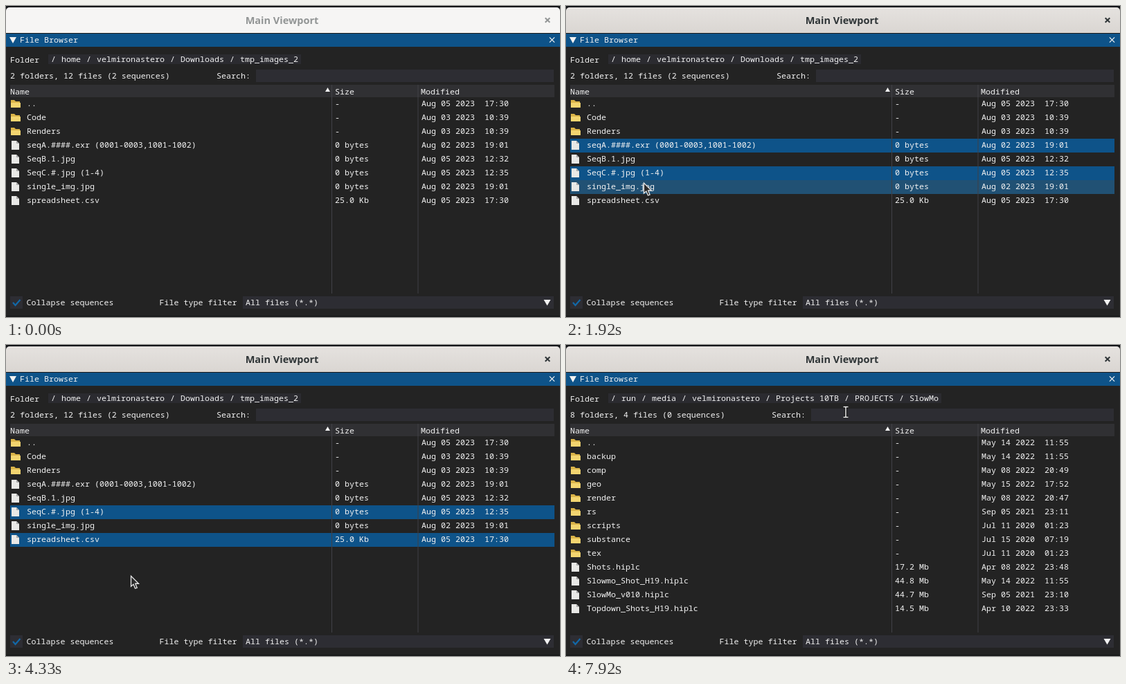
These frames come from a looping animation (800x450 px, 8000 ms). An HTML page with a canvas:

```html
<!DOCTYPE html>
<html>
<head>
<meta charset="utf-8">
<style>
html, body { margin: 0; width: 100%; height: 100%; overflow: hidden; background: #232323; }
canvas { display: block; width: 800px; height: 450px; }
</style>
</head>
<body>
<canvas id="stage" width="800" height="450"></canvas>
<script>
const g = document.getElementById('stage').getContext('2d');
const LOOP = 8000, STEP = 1000 / 12;
const BLUE = '#0e5389', HOVER = '#215174', FIELD = '#2d2d33', WHITE = '#f2f2f2';
const FOCUS_AT = 830, CLEAR_AT = 4400, OPEN_AT = 6550;

// name | size | date; an empty size marks a folder
const parse = text => text.trim().split('\n').map(line => line.split('|'));
const folders = [
  {
    path: ['/', 'home', '/', 'velmironastero', '/', 'Downloads', '/', 'tmp_images_2'],
    info: '2 folders, 12 files (2 sequences)',
    rows: parse(`
..||Aug 05 2023  17:30
Code||Aug 03 2023  10:39
Renders||Aug 03 2023  10:39
seqA.####.exr (0001-0003,1001-1002)|0 bytes|Aug 02 2023  19:01
SeqB.1.jpg|0 bytes|Aug 05 2023  12:32
SeqC.#.jpg (1-4)|0 bytes|Aug 05 2023  12:35
single_img.jpg|0 bytes|Aug 02 2023  19:01
spreadsheet.csv|25.0 Kb|Aug 05 2023  17:30`)
  },
  {
    path: ['/', 'run', '/', 'media', '/', 'velmironastero', '/', 'Projects 10TB', '/', 'PROJECTS', '/', 'SlowMo'],
    info: '8 folders, 4 files (0 sequences)',
    rows: parse(`
..||May 14 2022  11:55
backup||May 14 2022  11:55
comp||May 08 2022  20:49
geo||May 15 2022  17:52
render||May 08 2022  20:47
rs||Sep 05 2021  23:11
scripts||Jul 11 2020  01:23
substance||Jul 15 2020  07:19
tex||Jul 11 2020  01:23
Shots.hiplc|17.2 Mb|Apr 08 2022  23:48
Slowmo_Shot_H19.hiplc|44.8 Mb|May 14 2022  11:55
SlowMo_v010.hiplc|44.7 Mb|Sep 05 2021  23:10
Topdown_Shots_H19.hiplc|14.5 Mb|Apr 10 2022  23:33`)
  }
];

// pointer stops: time, x, y
const stops = [
  [450, -15, 297], [800, 90, 203], [1000, 100, 205], [1250, 138, 237], [1420, 138, 238],
  [1750, 120, 289], [2080, 105, 224], [2200, 105, 224], [2550, 60, 426], [2900, 93, 287],
  [3000, 93, 287], [3280, 118, 222], [3380, 118, 221], [3570, 128, 195], [3750, 128, 196],
  [4250, 180, 334], [4500, 182, 335], [5000, 408, 79], [5420, 402, 79], [5900, 85, 79],
  [6120, 61, 79], [6330, 100, 79], [6417, 232, 79], [6500, 250, 79], [6660, 408, 79],
  [7000, 515, 79], [7400, 440, 80], [7850, 404, 97], [8000, 404, 97]
];
// clicks that toggle a row: time, row
const clicks = [[FOCUS_AT, 3], [1420, 5], [2080, 4], [2960, 7], [3300, 4], [3700, 3]];

function pointerAt(t) {
  if (t < 490) return [-99, -99];
  const i = stops.findIndex(s => s[0] > t);
  const [t0, x0, y0] = stops[i - 1], [t1, x1, y1] = stops[i];
  let k = (t - t0) / (t1 - t0);
  k = k * k * (3 - 2 * k);
  return [x0 + (x1 - x0) * k, y0 + (y1 - y0) * k];
}

function box(x, y, w, h, color) {
  g.fillStyle = color;
  g.fillRect(x, y, w, h);
}

function poly(points, color) {
  g.beginPath();
  for (let i = 0; i < points.length; i += 2) g.lineTo(points[i], points[i + 1]);
  g.closePath();
  g.fillStyle = color;
  g.fill();
}

function lines(points, color, width) {
  g.beginPath();
  for (let i = 0; i < points.length; i += 4) {
    g.moveTo(points[i], points[i + 1]);
    g.lineTo(points[i + 2], points[i + 3]);
  }
  g.strokeStyle = color;
  g.lineWidth = width;
  g.stroke();
}

const cross = (x, y, r, color, w) =>
  lines([x - r, y - r, x + r, y + r, x - r, y + r, x + r, y - r], color, w);

// monospaced label, seven pixels per character, centred on y
function label(text, x, y) {
  g.font = '11.667px "Noto Sans Mono", "DejaVu Sans Mono", monospace';
  g.textAlign = 'left';
  g.fillStyle = WHITE;
  g.fillText(text, x, y + 4);
}

function folderIcon(y) {
  poly([7, y - 5, 12, y - 5, 14, y - 3, 20, y - 3, 20, y + 6, 7, y + 6], '#d9b348');
  poly([7, y - 1, 21, y - 1, 21, y + 6, 7, y + 6], '#f3d570');
}

function fileIcon(y) {
  poly([8, y - 6, 15, y - 6, 19, y - 2, 19, y + 7, 8, y + 7], '#e8e8e6');
  poly([15, y - 6, 19, y - 2, 15, y - 2], '#a9a9a9');
}

function windowFrame(focused) {
  box(0, 0, 800, 450, '#232323');
  box(0, 0, 800, 4, '#141619');
  const fill = g.createLinearGradient(0, 2, 0, 39);
  fill.addColorStop(0, focused ? '#e5e2df' : '#f6f5f4');
  fill.addColorStop(1, focused ? '#dad6d2' : '#f6f5f4');
  g.fillStyle = fill;
  g.beginPath();
  g.roundRect(0, 2, 800, 37, [5, 5, 0, 0]);
  g.fill();
  const ink = focused ? '#2f3537' : '#929595';
  g.font = '600 14.5px "Noto Sans", "Open Sans", sans-serif';
  g.textAlign = 'center';
  g.fillStyle = ink;
  g.fillText('Main Viewport', 398.5, 26);
  cross(782, 20.5, 3.3, ink, 2);

  box(0, 39, 800, 1, '#1b1b1b');
  box(0, 40, 800, 19, BLUE);
  poly([5, 45, 15, 45, 10, 54], WHITE);
  label('File Browser', 20, 49);
  cross(788.5, 49, 3.6, WHITE, 1.2);
}

function footer() {
  box(6, 420, 18, 18, FIELD);
  g.beginPath();
  g.moveTo(10, 429);
  g.lineTo(13.5, 433);
  g.lineTo(20.5, 425);
  g.strokeStyle = '#1268a8';
  g.lineWidth = 2.2;
  g.stroke();
  label('Collapse sequences', 29.5, 429);
  label('File type filter', 221.5, 429);
  box(342, 420, 449, 18, FIELD);
  label('All files (*.*)', 346, 429);
  poly([776.5, 425, 786.5, 425, 781.5, 433.5], WHITE);
  box(0, 448, 800, 2, '#191a1b');
}

function pathBar(path, px, py) {
  label('Folder', 6, 78);
  let x = 65;
  for (const part of path) {
    const w = part.length * 7 + 8;
    const over = px >= x - 4 && px < x - 4 + w && py >= 70 && py < 85;
    box(x - 4, 70, w, 14, over ? HOVER : '#2b2b30');
    label(part, x, 77);
    x += w;
  }
}

function table(rows, selected, px, py) {
  box(6, 114, 786, 18, '#303033');
  label('Name', 6, 124);
  label('Size', 475, 124);
  label('Modified', 599, 124);
  poly([461, 124, 468, 124, 464.5, 118], WHITE);
  rows.forEach(([name, size, date], i) => {
    const y = 141 + 20 * i;
    const over = px >= 6 && px < 792 && py >= y - 9 && py < y + 11;
    if (over || selected.has(i)) box(6, y - 9, 786, 20, over ? HOVER : BLUE);
    (size ? fileIcon : folderIcon)(y);
    label(name, 30, y);
    label(size || '-', 475, y);
    label(date, 600, y);
  });
  box(470, 114, 1, 302, '#414147');
  box(594.5, 114, 1, 302, '#414147');
}

function arrow(x, y) {
  g.save();
  g.translate(x, y);
  poly([0, 0, 0, 15, 3.5, 12, 6, 18, 8.7, 17, 6.3, 11, 11, 11], '#2b2b2b');
  g.strokeStyle = '#e6e6e6';
  g.lineWidth = 1.3;
  g.stroke();
  g.restore();
}

function beam(x, y) {
  const shape = [x - 3.5, y - 7.5, x + 3.5, y - 7.5, x, y - 7.5, x, y + 7.5, x - 3.5, y + 7.5, x + 3.5, y + 7.5];
  lines(shape, '#111', 3.5);
  lines(shape, '#eee', 1.5);
}

function draw(t) {
  const folder = folders[t < OPEN_AT ? 0 : 1];
  const [px, py] = pointerAt(t);
  const selected = new Set();
  if (t < CLEAR_AT) {
    for (const [at, row] of clicks) {
      if (t >= at && !selected.delete(row)) selected.add(row);
    }
  }
  windowFrame(t >= FOCUS_AT);
  pathBar(folder.path, px, py);
  label(folder.info, 6, 101);
  const searchX = 73 + folder.info.length * 7;
  label('Search:', searchX, 101);
  box(searchX + 57, 92, 791 - searchX - 57, 18, FIELD);
  table(folder.rows, selected, px, py);
  footer();
  const typing = px >= searchX + 57 && px < 791 && py >= 92 && py < 110;
  (typing ? beam : arrow)(px, py);
}

const start = performance.now();
function tick() {
  const t = (performance.now() - start) % LOOP;
  draw(Math.min(Math.floor(t / STEP + 0.05), 95) * STEP);
  requestAnimationFrame(tick);
}
tick();
</script>
</body>
</html>
```
